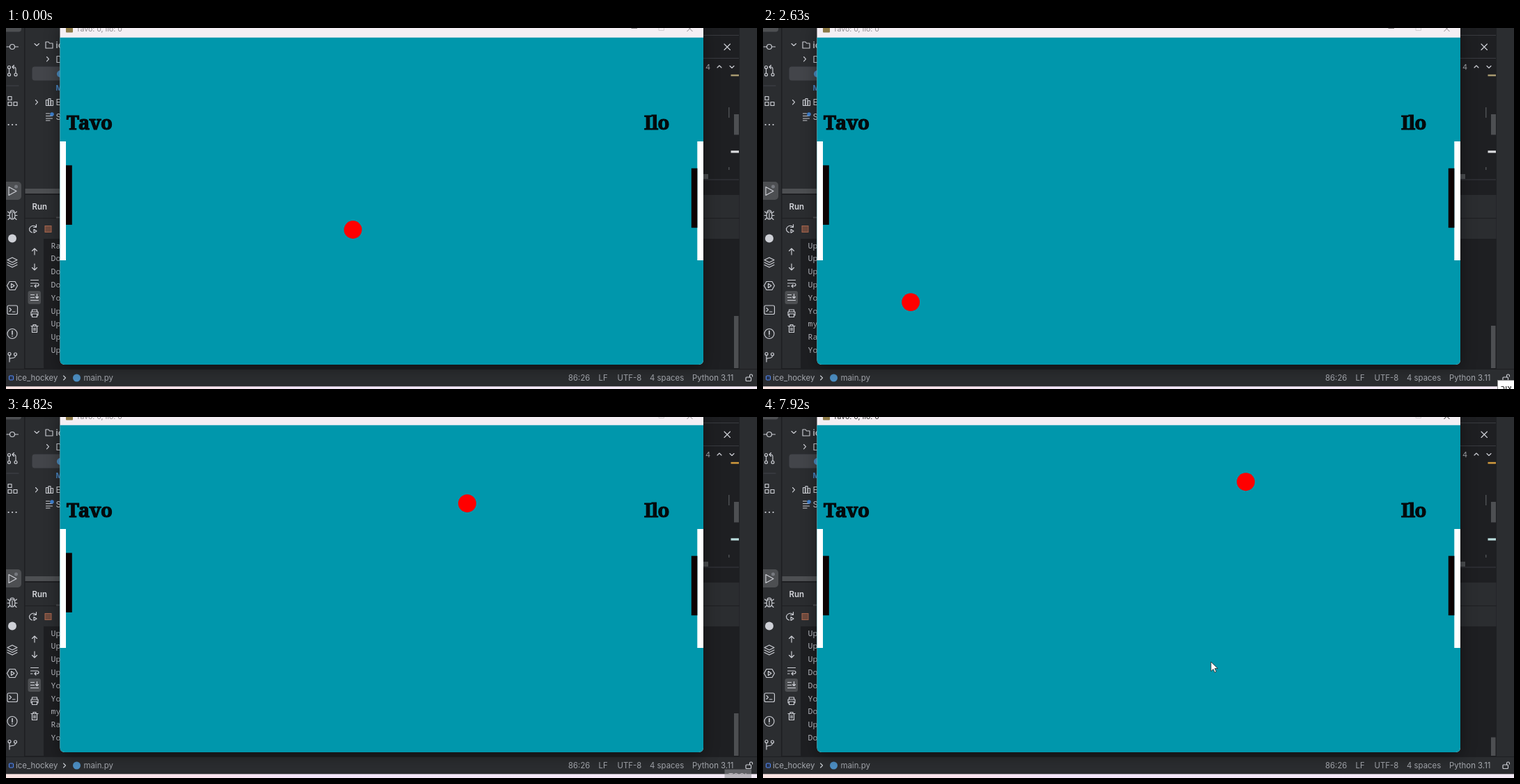
Animation, 1078 px wide and 519 px high, one loop 7.99 s. Source, as an HTML page:

```html
<!DOCTYPE html>
<html lang="en">
<head>
<meta charset="utf-8">
<title>Ice hockey</title>
<style>
  html, body { margin: 0; width: 100%; height: 100%; overflow: hidden; background: #1e1f22; }
  svg { display: block; width: 100vw; height: 100vh; }
  text { font-family: Inter, Roboto, sans-serif; font-size: 12px; white-space: pre; }
  .status text { fill: #a4a7ad; font-size: 11.4px; }
  .tree text { fill: #d5d7dc; }
  .log text { font-family: "Noto Sans Mono", "DejaVu Sans Mono", monospace; font-size: 11.5px; fill: #bcbec4; }
  .name text { font-family: "Noto Serif", "DejaVu Serif", serif; font-weight: 900; font-size: 27.5px; stroke: #050a0c; stroke-width: 1.2; fill: #050a0c; }
  .icons { fill: none; stroke: #ced0d6; stroke-width: 1.15; stroke-linecap: round; stroke-linejoin: round; }
  .window { fill: #f4eff4; filter: drop-shadow(0 5px 11px rgba(0, 0, 0, .4)); }
</style>
</head>
<body>
<svg viewBox="0 0 1078 519" preserveAspectRatio="none">
  <defs>
    <linearGradient id="desk">
      <stop offset="0" stop-color="#fbe4e2"/>
      <stop offset=".27" stop-color="#fae3ee"/>
      <stop offset=".4" stop-color="#f3e5fa"/>
      <stop offset="1" stop-color="#f5ebf6"/>
    </linearGradient>
    <clipPath id="rink"><path d="M77.5 13.5H1001V477q0 7-7 7H84.500q-7 0-7-7z"/></clipPath>
  </defs>

  <g id="screen">
    <!-- editor panels -->
    <rect width="1078" height="530" y="-5" fill="#1e1f22"/>
    <g fill="#2b2d30">
      <rect y="-5" width="26" height="495"/>
      <rect x="27.500" y="-5" width="60" height="243"/>
      <rect x="27.500" y="240" width="1025" height="33"/>
      <rect x="27.500" y="274" width="1025" height="29"/>
      <rect x="27.500" y="303" width="26.500" height="186"/>
      <rect x="1053" y="-5" width="26" height="495"/>
      <rect y="491" width="1078" height="25"/>
    </g>
    <rect y="515.300" width="1078" height="11" fill="url(#desk)"/>
    <g fill="#393b40">
      <rect x="1001" y="10" width="51" height="1"/>
      <rect x="1001" y="43" width="51" height="1"/>
      <rect x="1001" y="217.500" width="51" height="1"/>
    </g>
    <g fill="#4d4f52">
      <rect x="27.500" y="231" width="55" height="7"/>
      <rect x="1001" y="210" width="7" height="7"/>
      <rect x="1045" y="124" width="7" height="29.500"/>
      <rect x="1037" y="114" width="1.500" height="15"/>
      <rect x="1037" y="200" width="1.500" height="4"/>
      <rect id="thumb" x="1045" width="6.500" y="414" height="75"/>
      <rect x="-6" y="-8" width="28" height="13.500" rx="4"/>
      <rect x="-6" y="221" width="28" height="26" rx="5"/>
      <rect x="31.500" y="378" width="18.500" height="19" rx="3"/>
      <rect x="72" y="271.500" width="10" height="2"/>
    </g>
    <rect x="37.500" y="55.500" width="50" height="20" rx="4" fill="#43454a"/>
    <rect id="warn" x="1040.500" y="66.800" width="11.500" height="2.500"/>
    <rect id="mark" x="1040.500" y="176.300" width="11.500" height="3.200"/>

    <!-- tool icons -->
    <g class="icons">
      <path d="M1 27h4.500M13 27h4.500"/><circle cx="9" cy="27" r="3.500"/>
      <circle cx="4.500" cy="56.500" r="2"/><circle cx="4.500" cy="67" r="2"/><circle cx="14" cy="67" r="2"/>
      <path d="M4.500 59v6M14 65v-6q0-3-3-3H9m2.500-2.500L9 56l2.500 2.500"/>
      <path d="M1 83h17" stroke="#43454a"/>
      <rect x="3" y="98.500" width="5" height="5"/><rect x="3" y="106.500" width="5" height="5"/><rect x="11" y="106.500" width="5" height="5"/>
      <path d="M3.500 139h.2M9 139h.2M14.500 139h.2" stroke-width="2"/>
      <path d="M4 228.500v12l11-6z"/>
      <ellipse cx="9" cy="269.500" rx="4" ry="5.500"/>
      <path d="M6 265q0-3 3-3t3 3M5 269.500H2M16 269.500h-3M5 266l-2.500-2M13 266l2.500-2M5.500 273L3 275.500M12.500 273l2.500 2.500M9 266v8"/>
      <path d="M9 330l7 3.500-7 3.500-7-3.500zM2 337l7 3.500 7-3.500M2 340.500l7 3.500 7-3.500"/>
      <path d="M5 364.500h8l3.500 6-3.500 6H5l-3.500-6zM7.500 367.500v6l4.500-3z"/>
      <rect x="2" y="399" width="14.500" height="12.500" rx="2"/><path d="M5 402.500l2.500 2.500L5 407.500M9.500 408H13"/>
      <circle cx="9" cy="439.500" r="7"/><path d="M9 435.500v5M9 443v.1" stroke-width="1.600"/>
      <circle cx="5" cy="468.500" r="2"/><circle cx="13.500" cy="469" r="2"/><path d="M5 471v9M5 477q0-2.500 4-2.500t4.500-3"/>

      <path d="M43.500 286q-3-2.500-6-1.500t-4 4q0 4.500 4 5.500M43.500 282.500v4h-4M40 289.500v5l4-2.500z"/>
      <path d="M41 326v-9m-3.500 3.500l3.500-3.500 3.500 3.500M41 339v9m-3.500-3.500l3.500 3.500 3.500-3.500"/>
      <path d="M35.500 362.500h11M35.500 367h9q2.500 0 2.500 2t-2.500 2H41m2-2l-2 2 2 2M35.500 371h2.500"/>
      <path d="M35.500 383.500h5M35.500 387.500h5M35.500 391.500h11M44.500 382.500v6m-2-2l2 2 2-2"/>
      <path d="M37.500 408v-3h7v3M37.500 413H36v-5h10v5h-1.500M37.500 411h7v4.500h-7z"/>
      <path d="M36 428.500h10M39 428v-1.500h4v1.500M37.500 428.500v9h7v-9M40 431v4M42 431v4"/>

      <path d="M41 22.500l3.200 3 3.200-3M58.500 41.500l3 3.200-3 3.200M42.500 103.500l3 3.200-3 3.200"/>
      <path d="M57 20h4l1.500 2H67v7H57zM73 40.500h4l1.500 2H83v7H73z"/>
      <path d="M57.500 103.500h3v8h-3zM61 101.500h3v10h-3zM64.500 104.500h3v7h-3z"/>
      <path d="M57.500 123h5M57.500 126.500h9M57.500 130h9M57.500 133H63"/>
      <path d="M1031 23l8.500 8.500M1039.500 23l-8.500 8.500M1021 57l3-3 3 3M1039 54.500l3 3 3-3"/>
      <path d="M82.500 500l3 3-3 3"/>
      <rect x="1062" y="502" width="7.500" height="5.500" rx="1"/><path d="M1067.500 502v-2q0-2 2-2t2 2v1"/>
    </g>
    <rect x="56" y="284.500" width="9" height="9" fill="#704b3e" stroke="#a8674f"/>
    <rect x="4.500" y="500" width="6" height="6" rx="1" fill="#25324d" stroke="#548af7"/>
    <circle cx="9" cy="302.500" r="6" fill="#ced0d6"/>
    <circle cx="14.500" cy="228" r="2.500" fill="#76797f"/>
    <circle cx="66" cy="124" r="2.800" fill="#3f82d0"/>
    <circle cx="78" cy="66" r="5" fill="#4d8fc4"/>
    <circle cx="101.500" cy="503" r="5.500" fill="#4d8fc4"/>

    <g class="tree">
      <text x="71.500" y="28.500" font-weight="600">ice</text>
      <text x="71.500" y="90" style="fill:#4a88c7;font-size:10px" font-weight="700">M</text>
      <text x="71.500" y="111">E</text>
      <text x="71.500" y="131.500">S</text>
      <text x="37.500" y="260.500" font-weight="600" style="font-size:11.400px">Run</text>
      <text x="1004" y="60" style="fill:#a4a7ad;font-size:11px">4</text>
    </g>
    <g class="log" id="log"></g>
    <g class="status">
      <text x="14" y="507">ice_hockey</text><text x="111.500" y="507">main.py</text>
      <text x="807" y="507">86:26</text><text x="850.500" y="507">LF</text>
      <text x="877.500" y="507">UTF-8</text><text x="924" y="507">4 spaces</text>
      <text x="985" y="507">Python 3.11</text>
    </g>

    <!-- game window -->
    <path class="window" d="M77.500-6H1001V477q0 7-7 7H84.500q-7 0-7-7z"/>
    <rect x="86" y="-3" width="10" height="9.500" rx="1" fill="#8c7a48"/>
    <text id="title" x="100.500" y="4.500" style="font-size:10.500px">Tavo: 0, Ilo: 0</text>
    <g id="buttons" fill="none">
      <path d="M897.500.5h8.500"/><path d="M937 -4h7.500v7.500H937z" stroke="#d2ced2"/>
      <path d="M977.500-3l8 8M985.500-3l-8 8"/>
    </g>
    <g clip-path="url(#rink)">
      <rect x="77" y="13.500" width="925" height="471" fill="#0097ac"/>
      <rect x="77" y="163" width="9" height="171" fill="#fff"/>
      <rect x="992.300" y="163" width="9" height="171" fill="#fff"/>
      <rect id="left" x="86" width="8.800" height="85.500" fill="#0c0203"/>
      <rect id="right" x="983.800" width="8.600" height="85.500" fill="#0c0203"/>
      <g class="name">
        <text x="87" y="146" letter-spacing="-.4">Tavo</text>
        <text x="916" y="146" letter-spacing="-.6">Ilo</text>
      </g>
      <circle id="ball" r="12.900" fill="#f00"/>
    </g>
  </g>

  <g id="tip">
    <rect x="1054.500" y="506.500" width="40" height="20" fill="#fff" stroke="#8c8c8c"/>
    <text x="1059" y="521" style="font-family:'DejaVu Sans',sans-serif;font-size:11px">צור</text>
  </g>
  <g id="fadeTip">
    <rect x="1031.500" y="506.500" width="38.500" height="20" fill="#8d8d90" fill-opacity=".55"/>
    <text x="1037" y="520" style="fill:#bdb9bd;font-size:11px">TOOL</text>
  </g>
  <path id="cursor" d="M0 0V13.500L3.300 10.500 5.400 15.200 7.600 14.200 5.500 9.600H9.800Z" fill="#fff" stroke="#222" stroke-width=".8"/>
</svg>

<script>
const LOOP = 7990;
const $ = id => document.getElementById(id);
const set = (id, attrs) => { for (const k in attrs) $(id).setAttribute(k, attrs[k]); };
const show = (id, on) => set(id, { visibility: on ? "visible" : "hidden" });

// Piecewise linear lookup over [input, output] pairs.
function lerp(keys, v) {
  let i = 1;
  while (i < keys.length - 1 && v > keys[i][0]) i++;
  const [a, p] = keys[i - 1], [b, q] = keys[i];
  return p + (q - p) * Math.min(1, Math.max(0, (v - a) / (b - a)));
}

const clock = [[0, 0], [1700, 25], [3420, 51], [4820, 72], [5900, 88], [7110, 106], [7920, 118], [7990, 119]];
const travel = [[0, 0], [25, 349], [51, 702], [72, 989], [88, 1205], [106, 1453], [118, 1617], [119, 1631]];

// The puck reflects off the walls and retraces its way after each goal line.
const route = [[498, 290], [303, 485], [85.5, 267.5], [303, 485], [775.5, 12.8], [991.5, 228.8], [775.5, 12.8], [400, 388]];
let sum = 0;
const legs = route.map(([x, y], i) => {
  if (i) sum += Math.abs(x - route[i - 1][0]);
  return [sum, x, y];
});
const pathX = legs.map(([d, x]) => [d, x]);
const pathY = legs.map(([d, , y]) => [d, y]);

const STEP = 4.27;
const leftSteps = [[80, 0], [84, 2], [90, 2], [100, -3], [107, -3], [114, 1]];
const rightSteps = [[96, 0], [104, 4], [108, 4], [116, 0]];

const words = ("Ra Do Do Do Yo Up Up Up Up Yo Yo my Ra Yo Yo " + "Up ".repeat(12) + "Do Do Yo Do Up Do").split(" ");
const printed = [[20, 0], [21, 1], [29, 1], [33, 5], [79, 5], [80, 6], [89, 6], [105, 18], [107, 18], [117, 24]];
const thumbTop = [[0, 414], [1, 417.5], [5, 428], [6, 430], [18, 459], [24, 462.5]];

const rows = Array.from({ length: 9 }, (_, i) => {
  const row = document.createElementNS("http://www.w3.org/2000/svg", "text");
  row.setAttribute("x", 64.5);
  row.setAttribute("y", 316.5 + i * 18.8);
  return $("log").appendChild(row);
});

function draw(ms) {
  const tick = Math.floor(lerp(clock, ms) + 1e-6);
  const shift = tick < 43 ? 0 : tick < 56 ? -1 : -2;
  set("screen", { transform: `translate(0 ${shift})` });

  const d = lerp(travel, tick);
  set("ball", { cx: lerp(pathX, d), cy: lerp(pathY, d) });
  set("left", { y: 197.4 + STEP * Math.round(lerp(leftSteps, tick)) });
  set("right", { y: 201.7 + STEP * Math.round(lerp(rightSteps, tick)) });

  const first = Math.floor(lerp(printed, tick) + 1e-6);
  rows.forEach((row, i) => row.textContent = words[first + i]);
  const top = lerp(thumbTop, first);
  set("thumb", { y: top, height: 489 - top });

  const active = tick >= 80;
  set("title", { fill: active ? "#2b2b2b" : "#8d898d" });
  set("buttons", { stroke: active ? "#222" : "#8d898d" });
  set("warn", { fill: tick < 43 ? "#a89a70" : tick < 56 ? "#c4ac50" : "#d29a3c" });
  set("mark", { fill: tick < 56 ? "#dcdde0" : "#b9dcdc" });

  show("tip", tick >= 20 && tick < 70);
  show("fadeTip", tick >= 70 && tick < 73);
  show("cursor", tick >= 74);
  const left = 1 - lerp([[74, 0], [80, 1]], tick);
  const ease = left * left;
  set("cursor", { transform: `translate(${643 + 330 * ease} ${352 + 145 * ease})` });
}

const start = performance.now();
function loop() {
  draw((performance.now() - start) % LOOP);
  requestAnimationFrame(loop);
}
draw(0);
requestAnimationFrame(loop);
</script>
</body>
</html>
```
